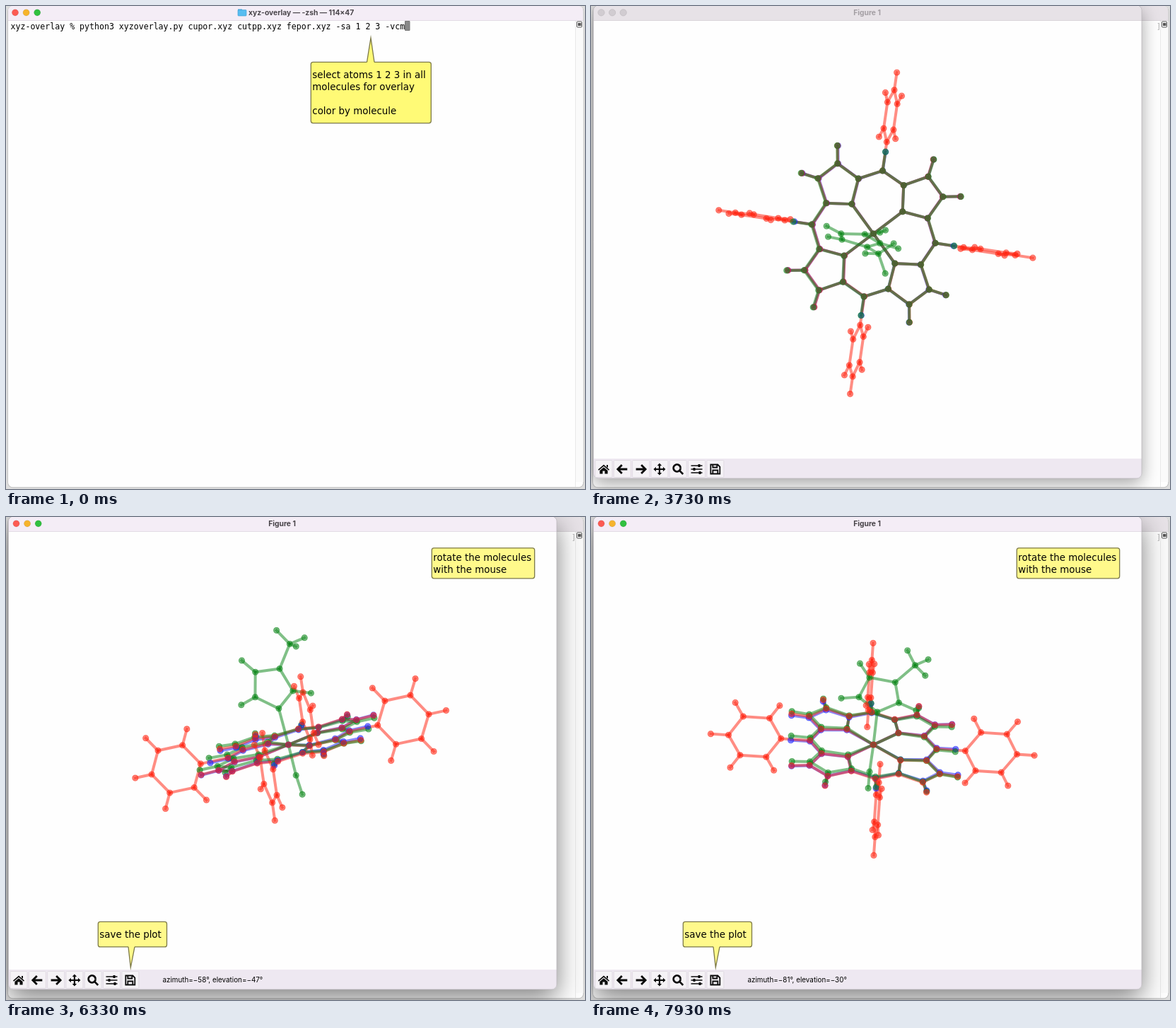
Recreate the animation shown at these times as an HTML page with a canvas. Size 819 px wide and 683 px high, loop 8 s.

```html
<!DOCTYPE html>
<html lang="en">
<head>
<meta charset="utf-8">
<title>Molecule overlay</title>
<style>
html, body { margin: 0; width: 100%; height: 100%; overflow: hidden; }
canvas { display: block; }
</style>
</head>
<body>
<canvas id="stage" width="819" height="683"></canvas>
<script>
const ctx = document.getElementById('stage').getContext('2d');
const LOOP = 8000, OPEN = 3070, ACTIVE = 4330, NOTES = 4800;
const BLUE = '#1a20ff', RED = '#ff2412', GREEN = '#0c8619';

// ---------- molecules, in a local frame: a, b in the plane, c along its normal ----------
const AXES = [[.967, .256, -.018], [-.1025, .4647, .879], [.233, -.848, .475]];

function molecule(color, warp, phenyl) {
  const atoms = [], bonds = [];
  const link = (i, j) => bonds.push([i, j]);
  const add = (a, b, c, ...partners) => {
    const p = [0, 1, 2].map(k => a * AXES[0][k] + b * AXES[1][k] + c * AXES[2][k]);
    const id = atoms.push(p) - 1;
    partners.forEach(j => link(j, id));
    return id;
  };
  const metal = add(0, 0, 0), first = [], meso = [];
  for (let q = 0; q < 4; q++) {
    const put = (a, b, c, ...partners) => {
      for (let i = 0; i < q; i++) [a, b] = [-b, a];
      return add(a, b, c + warp(a, b), ...partners);
    };
    const n = put(37, 37, 0, metal);
    const a1 = put(74, 33, 0, n), b1 = put(91, 66, 0, a1);
    const b2 = put(66, 91, 0, b1), a2 = put(33, 74, 0, b2, n);
    put(116, 70, 0, b1);
    put(70, 116, 0, b2);
    const m = put(0, 90, 0, a2);
    first.push(a1);
    meso.push(m);
    if (!phenyl) { put(0, 117, 0, m); continue; }
    const ring = [];
    for (let k = 0; k < 6; k++) {
      const u = -Math.cos(k * Math.PI / 3), v = Math.sin(k * Math.PI / 3);
      ring.push(put(0, 168 + 37 * u, 37 * v, k ? ring[k - 1] : m));
      if (k) put(0, 168 + 62 * u, 62 * v, ring[k]);
    }
    link(ring[5], ring[0]);
  }
  meso.forEach((m, q) => link(m, first[(q + 1) % 4]));
  return { color, atoms, bonds, add, metal };
}

const iron = molecule(GREEN, (a, b) => 1.5 - .035 * a - .02 * b);
{
  const { add, metal } = iron;
  const n = add(0, 0, 54, metal);
  const c1 = add(28, -8, 76, n), c2 = add(19, -14, 112, c1);
  const c3 = add(-17, -9, 114, c2), c4 = add(-28, -3, 78, c3, n);
  add(53, -12, 68, c1);
  add(-32, -7, 134, c3);
  add(-52, 4, 70, c4);
  const methyl = add(43, -19, 144, c2);
  add(30, -20, 167, methyl);
  add(62, -2, 145, methyl);
  add(56, -44, 143, methyl);
  add(0, 4, -76, add(-1, 1, -46, metal));
}
const MOLECULES = [
  molecule(BLUE, (a, b) => .015 * (a - b)),
  molecule(RED, () => 0, true),
  iron
];

// time, azimuth, elevation
const VIEWS = [
  [5250, -60, 30], [5800, -61, -37], [5870, -60.5, -41.5], [6330, -58, -48], [6530, -58, -48],
  [6730, -53, -37], [6830, -53, -37], [7860, -81, -30]
];

function viewAt(t) {
  const i = VIEWS.findIndex(v => v[0] > t);
  if (i === 0) return VIEWS[0].slice(1);
  if (i < 0) return VIEWS[VIEWS.length - 1].slice(1);
  const [p, q] = [VIEWS[i - 1], VIEWS[i]], f = (t - p[0]) / (q[0] - p[0]);
  return [1, 2].map(k => p[k] + (q[k] - p[k]) * f);
}

function project([x, y, z], [az, el]) {
  const A = az * Math.PI / 180, E = el * Math.PI / 180;
  const right = y * Math.cos(A) - x * Math.sin(A);
  const front = x * Math.cos(A) + y * Math.sin(A);
  const depth = front * Math.cos(E) + z * Math.sin(E);
  const s = 1 / (1 - depth / 3340);
  return [399.5 + right * s, 322 - (z * Math.cos(E) - front * Math.sin(E)) * s, depth];
}

function drawMolecules(view) {
  const shown = MOLECULES.map(m => {
    const points = m.atoms.map(p => project(p, view));
    return { ...m, points, near: Math.max(...points.map(p => p[2])) };
  });
  ctx.save();
  ctx.globalAlpha = .52;
  ctx.lineCap = 'square';
  ctx.lineWidth = 4;
  for (const { color, bonds, points } of shown) {
    ctx.strokeStyle = color;
    for (const [i, j] of bonds) {
      ctx.beginPath();
      ctx.moveTo(points[i][0], points[i][1]);
      ctx.lineTo(points[j][0], points[j][1]);
      ctx.stroke();
    }
  }
  ctx.lineWidth = 1.2;
  shown.sort((p, q) => p.near - q.near);
  for (const { color, points } of shown) {
    ctx.fillStyle = ctx.strokeStyle = color;
    for (const [x, y] of points) {
      ctx.beginPath();
      ctx.arc(x, y, 4, 0, 7);
      ctx.fill();
      ctx.stroke();
    }
  }
  ctx.restore();
}

// ---------- windows ----------
function rect(x, y, w, h, fill) {
  ctx.fillStyle = fill;
  ctx.fillRect(x, y, w, h);
}

function box(x, y, w, h, r, fill, stroke, width = 1) {
  ctx.beginPath();
  ctx.roundRect(x, y, w, h, r);
  ctx.fillStyle = fill;
  ctx.fill();
  if (!stroke) return;
  ctx.strokeStyle = stroke;
  ctx.lineWidth = width;
  ctx.stroke();
}

function text(str, x, y, font, color = '#000', align = 'left') {
  ctx.font = font;
  ctx.fillStyle = color;
  ctx.textAlign = align;
  ctx.fillText(str, x, y);
}

const SANS = 'Inter, "Liberation Sans", sans-serif';

function lights(x, active) {
  ['#fc5b53', '#f6b42d', '#30c03f'].forEach((c, i) => {
    ctx.beginPath();
    ctx.arc(x + i * 15.6, 9.3, 4.6, 0, 7);
    ctx.fillStyle = active ? c : '#d1ccd1';
    ctx.fill();
    ctx.strokeStyle = active ? 'rgba(0,0,0,.12)' : '#bfbabf';
    ctx.lineWidth = .7;
    ctx.stroke();
  });
}

function windowFrame(x, w, h, active) {
  ctx.save();
  ctx.beginPath();
  ctx.roundRect(x, 0, w, h, 7);
  ctx.clip();
  rect(x, 0, w, h, '#fefefe');
  rect(x, 0, w, 20, active ? '#f4edf6' : '#e7e2e7');
  rect(x, 20, w, 1, active ? '#e3dce5' : '#dad5da');
  ctx.restore();
}

function terminal(t) {
  const active = t < OPEN;
  rect(0, 0, 819, 683, '#dedede');
  box(2, 0, 815.5, 681.5, 8, '#c4c4c4');
  windowFrame(3, 813.5, 680.5, active);
  lights(13, active);
  rect(805, 21, 11.5, 652, '#fafafa');
  rect(805, 21, 1, 659, '#e9e9e9');
  box(807.5, 22, 7, 8, 1, '#fff', '#555');
  rect(809, 24, 4.5, 4, '#555');
  if (active) {
    rect(328, 4.5, 6, 4, '#38a5de');
    box(328, 5.5, 12, 8.5, 1, '#58bdf0', '#3a9cd2', .6);
  }
  text('xyz-overlay — -zsh — 114×47', 343, 12.8, `700 10.3px ${SANS}`, active ? '#4a464b' : '#aaa');
  text('xyz-overlay % python3 xyzoverlay.py cupor.xyz cutpp.xyz fepor.xyz -sa 1 2 3 -vcm',
    6.5, 33, '11.58px "DejaVu Sans Mono", monospace');
  if (!active) text(']', 800, 32, '10px "DejaVu Sans Mono", monospace', '#aaa');
  const blink = t < 70 || (t >= 530 && Math.floor((t - 30) / 500) % 2 === 1);
  if (active && t < 3000 && blink) box(564.5, 21.5, 6.5, 13, 0, '#888', '#777');
}

const ICONS = [
  ['M-8 .5L0-6.5 8 .5 7 1.8 0-4.3-7 1.8ZM-5.6 2L0-2.8 5.6 2V6.5H1.5V2.6H-1.5V6.5H-5.6ZM4-6H6V-2L4-3.8Z', '', 1],
  ['', 'M-.5-6L-6.5 0-.5 6M-6 0H7', 2.8],
  ['', 'M.5-6L6.5 0 .5 6M6 0H-7', 2.8],
  ['M0-8.5L3.2-5H-3.2ZM0 8.5L3.2 5H-3.2ZM-8.5 0L-5-3.2V3.2ZM8.5 0L5-3.2V3.2Z', 'M-6 0H6M0-6V6', 2.2],
  ['', 'M3.4-1.6A5 5 0 1 1 3.4-1.7M2.2 2.2L7 7', 2.6],
  ['M2-7H5V-3H2ZM-5-2H-2V2H-5ZM3 3H6V7H3Z', 'M-8-5H8M-8 0H8M-8 5H8', 1.5],
  ['', 'M-6.5-6.5H3.5L6.5-3.5V6.5H-6.5ZM-3.5-6V-2.5H2.5V-6M-3.5 6V1.5H3.5V6', 1.8]
];

function toolbar() {
  ICONS.forEach(([solid, line, width], i) => {
    const x = 18 + i * 26.3;
    box(x - 12, 642.5, 24, 24, 1, '#f5f2f6', '#dcd7df', .8);
    ctx.save();
    ctx.translate(x, 655);
    ctx.fillStyle = ctx.strokeStyle = '#0a0a0a';
    ctx.lineWidth = width;
    ctx.fill(new Path2D(solid));
    ctx.stroke(new Path2D(line));
    ctx.restore();
  });
}

function figure(t) {
  const active = t >= ACTIVE;
  const grow = Math.min(1, (t - OPEN) / 200), s = .9 + .1 * grow;
  ctx.save();
  ctx.globalAlpha = grow;
  ctx.translate(391 * (1 - s), 334 * (1 - s));
  ctx.scale(s, s);
  ctx.save();
  ctx.shadowColor = `rgba(0,0,0,${active ? .5 : .36})`;
  ctx.shadowBlur = active ? 36 : 24;
  ctx.shadowOffsetY = active ? 12 : 7;
  box(3.5, 0, 775.5, 668, 7, '#fff');
  ctx.restore();
  windowFrame(3.5, 775.5, 668, active);
  box(3.5, 640, 775.5, 28, [0, 0, 7, 7], '#eee8f1');
  ctx.beginPath();
  ctx.roundRect(3.5, -1, 775.5, 669, 7);
  ctx.strokeStyle = '#b9b5ba';
  ctx.lineWidth = .7;
  ctx.stroke();
  lights(14.5, active);
  text('Figure 1', 390.5, 12.8, `700 10.3px ${SANS}`, active ? '#454146' : '#a39ea3', 'center');
  toolbar();
  if (grow === 1) drawMolecules(viewAt(t));
  ctx.restore();
}

function note(x, y, w, h, fill, lines, textY, tail) {
  const edge = '#7c7947';
  box(x, y, w, h, 3, fill, edge, 1.3);
  if (tail) {
    const [x1, tipX, tipY, x2] = tail, base = tipY < y ? y : y + h;
    const inset = tipY < y ? 1 : -1;
    ctx.beginPath();
    ctx.moveTo(x1, base + inset);
    ctx.lineTo(x1, base);
    ctx.lineTo(tipX, tipY);
    ctx.lineTo(x2, base);
    ctx.lineTo(x2, base + inset);
    ctx.fillStyle = fill;
    ctx.fill();
    ctx.beginPath();
    ctx.moveTo(x1, base);
    ctx.lineTo(tipX, tipY);
    ctx.lineTo(x2, base);
    ctx.stroke();
  }
  lines.forEach((s, i) => text(s, x + 2, textY + i * 17, '13.4px "DejaVu Sans", sans-serif'));
}

const signed = v => String(Math.round(v)).replace('-', '−');

function draw(t) {
  terminal(t);
  if (t < 3000) {
    note(431.3, 79.3, 170, 86.3, '#fffa76',
      ['select atoms 1 2 3 in all', 'molecules for overlay', '', 'color by molecule'],
      101.5, [510.5, 516, 45, 521]);
  }
  if (t >= OPEN) figure(t);
  if (t >= NOTES) {
    note(602.3, 43.8, 145.4, 43, '#fff98b', ['rotate the molecules', 'with the mouse'], 61.5);
    note(130.3, 572.3, 97.2, 35.6, '#fff98b', ['save the plot'], 595, [173, 176.3, 637, 182]);
    // the readout trails the picture by one step
    const [az, el] = viewAt(t - 67);
    text(`azimuth=${signed(az)}°, elevation=${signed(el)}°`, 221.5, 658.3, `9.85px ${SANS}`);
  }
}

const start = performance.now();
function tick() {
  draw((performance.now() - start) % LOOP);
  requestAnimationFrame(tick);
}
tick();
</script>
</body>
</html>
```
